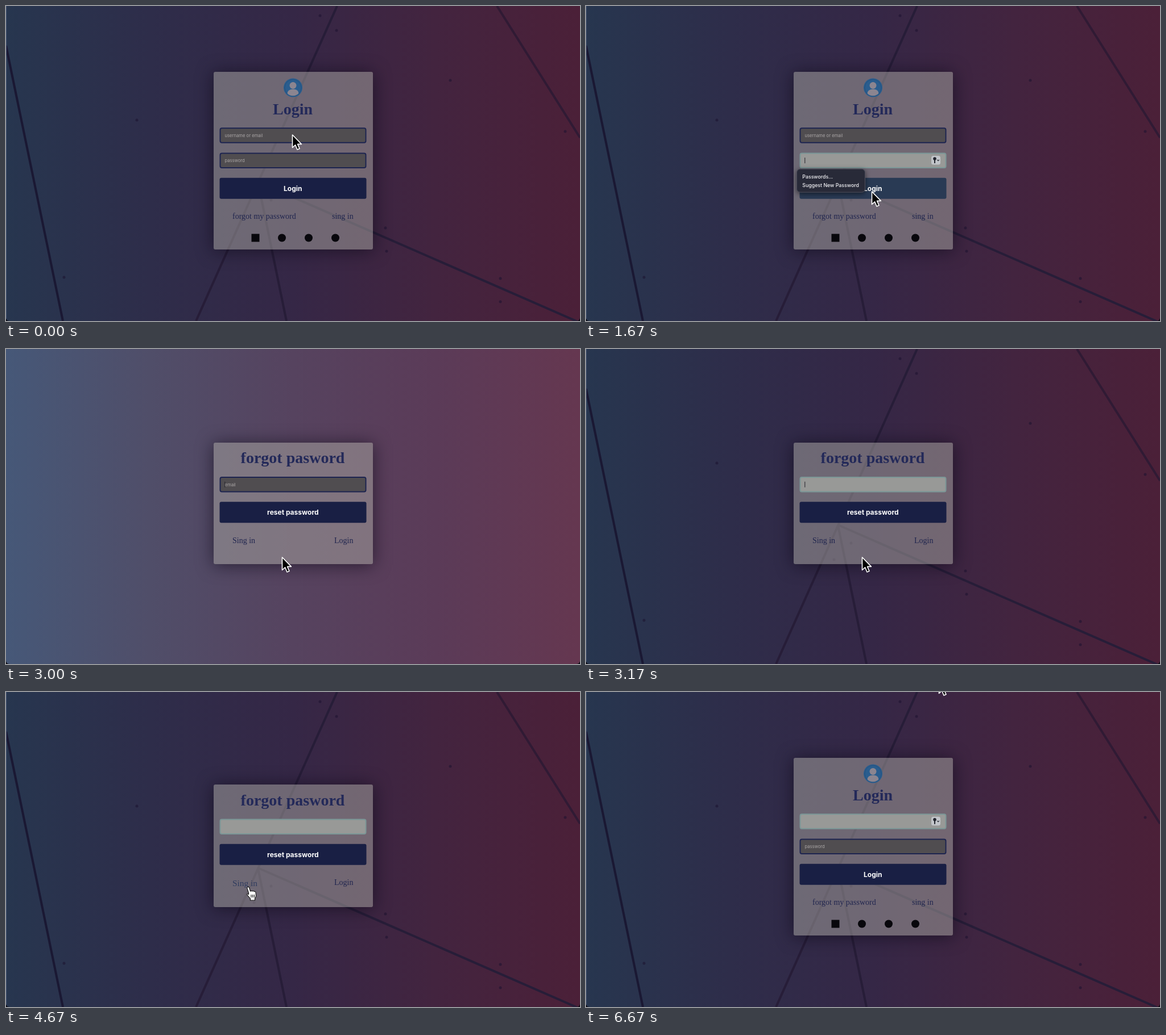
These frames come from a looping animation (1009x555 px, 6840 ms). An HTML page:

```html
<!DOCTYPE html>
<html lang="en">
<head>
<meta charset="utf-8">
<title>Login form</title>
<style>
html, body { margin: 0; width: 100%; height: 100%; overflow: hidden; background: #0b0a12; }
#stage { position: relative; width: 1009px; height: 555px; overflow: hidden; border-radius: 0 0 6px 6px;
  background: linear-gradient(90deg, #27364f, #2e2d4a 25%, #352746 50%, #43243f 75%, #4b2038); }
#stage.fresh { background: linear-gradient(90deg, #465878, #504e69 25%, #56435f 50%, #5b3b58 75%, #653750); }
#stage.fresh #lines { display: none; }
svg { position: absolute; left: 0; top: 0; }
#card { position: absolute; left: 364.5px; width: 280px; border-radius: 3px;
  background: rgba(170, 168, 162, .5); box-shadow: 0 2px 30px rgba(10, 6, 20, .6); }
text { white-space: pre; }
.title { font: bold 28px "Liberation Serif", serif; fill: #232959; text-anchor: middle; }
.link { font: 14px "Liberation Serif", serif; fill: #21264f; }
.ui { font: 7.65px Inter, sans-serif; fill: #aaa6a6; }
.button { font: bold 12px Inter, sans-serif; fill: #fff; text-anchor: middle; }
.menu { font: 500 8.8px Inter, sans-serif; fill: #f2f2f5; }
</style>
</head>
<body>
<div id="stage">
  <svg id="lines" width="1009" height="555" fill="none" stroke-width="4">
    <path stroke="#1a1833" d="M0 70L100 555"/>
    <path stroke="#271d38" d="M582 0L443 311L334 555M443 311L493 555M443 310L1009 558"/>
    <path stroke="#301a34" d="M863 0L1009 232"/>
    <g id="dots" fill="#1c1230" opacity=".55"></g>
    <path stroke="#4c5a78" stroke-width="1" d="M.5 0V555"/>
  </svg>
  <div id="card"></div>
  <svg id="form" width="1009" height="555"></svg>
</div>
<script>
const $ = id => document.getElementById(id);
const STEP = 1000 / 6, LAST = 40, LOOP = 6840;

// Pointer stops: step, x, y
const path = [[0, 503, 227], [4, 503, 227], [6, 502, 272], [8, 502, 272], [9, 502, 320], [10, 502, 327],
  [13, 502, 327], [16, 485, 367], [20, 485, 367], [22, 468, 290], [24, 468, 290], [26, 418, 337],
  [30, 418, 337], [32, 490, 370], [33, 493, 399], [36, 493, 399], [40, 620, -20]];
const clicks = [3, 8, 12, 17, 29, 35];

// Focus changes: step, field index
const focuses = [[0, -1], [3, 0], [8, 1], [13, 0], [18, 0], [30, 0], [36, 0]];

const pages = {
  login: { top: 115.5, bottom: 428.5, title: 'Login', base: 190.5, first: 214.3, button: 'Login',
    fields: ['username or email', 'password'],
    links: [['forgot my password', 398, 375, 112], ['sing in', 573, 375, 38]] },
  forgot: { top: 164.5, bottom: 378.5, title: 'forgot pasword', base: 201, first: 225, button: 'reset password',
    fields: ['email'],
    links: [['Sing in', 398, 341.5, 40], ['Login', 577, 341.5, 34]] },
  register: { top: 114, bottom: 430, title: 'Register', base: 151, first: 174.8, button: 'Register',
    fields: ['username', 'e-mail', 'password', 'password repeat'],
    links: [['Login', 487.5, 408, 34]] }
};

$('dots').innerHTML = [[581, 43], [552, 17], [781, 131], [983, 221], [667, 391], [669, 432], [869, 480],
  [869, 521], [230, 201], [102, 478], [466, 342], [436, 371]]
  .map(([x, y]) => `<circle cx="${x}" cy="${y}" r="2.5"/>`).join('');

const text = (kind, x, y, s, style = '') => `<text class="${kind}" x="${x}" y="${y}" style="${style}">${s}</text>`;
const box = (x, y, w, h, r, fill, more = '') =>
  `<rect x="${x}" y="${y}" width="${w}" height="${h}" rx="${r}" fill="${fill}" ${more}/>`;
const disc = (x, y, r, fill, more = '') => `<circle cx="${x}" cy="${y}" r="${r}" fill="${fill}" ${more}/>`;

function pointer(n) {
  const i = Math.max(1, path.findIndex(p => p[0] >= n));
  const [t0, x0, y0] = path[i - 1], [t1, x1, y1] = path[i];
  const u = Math.max(0, (n - t0) / (t1 - t0)), e = u * u * (3 - 2 * u);
  return [x0 + (x1 - x0) * e, y0 + (y1 - y0) * e];
}

const pageAt = n => pages[n < 18 || n > 35 ? 'login' : n < 30 ? 'forgot' : 'register'];
const within = ([px, py], x, y, w, h) => px >= x && px <= x + w && py >= y && py <= y + h;
const onLink = (p, [, x, y, w]) => within(p, x, y - 13, w, 18);

function avatar(y) {
  return disc(504.5, y, 16.5, '#2a5d8e') + disc(504.5, y, 14.6, 'none', 'stroke="#24517f"') +
    disc(504.5, y - 4, 6, '#8b8590') +
    `<path fill="#8b8590" d="M494.5 ${y + 10}q1-7.5 10-7.5t10 7.5q-4 4.3-10 4.3t-10-4.3z"/>`;
}

function keyIcon(y) {
  return box(607, y + 5.5, 16, 15.5, 3.5, '#c1c4c9') + disc(613, y + 10.5, 2.8, '#22252e') +
    `<path fill="none" stroke="#22252e" stroke-width="2" d="M613 ${y + 12}v6.5"/>` +
    `<path fill="none" stroke="#22252e" stroke-width="1.1" d="M617.3 ${y + 12.5}l1.8 1.8 1.8-1.8"/>`;
}

function field(label, y, focused, dim, caret, key) {
  const lit = focused && !dim;
  return box(376.5, y + 1, 256, 25.5, 3, lit ? '#989997' : '#504d50',
    `stroke="${lit ? '#7b9797' : '#1d2450'}" stroke-width="2"`) +
    (lit ? '' : text('ui', 384.5, y + 16.8, label)) +
    (caret ? box(384.3, y + 8.7, 1, 10, 0, '#22222a') : '') +
    (lit && key ? keyIcon(y) : '');
}

function menu(y) {
  return box(370.5, y, 120, 41, 6, '#282a38', 'stroke="#50505e" style="filter:drop-shadow(0 2px 4px #0008)"') +
    text('menu', 380.3, y + 16.4, 'Passwords...') + text('menu', 380.3, y + 31.8, 'Suggest New Password');
}

function cursor([x, y], hand) {
  return hand
    ? `<g transform="translate(${x + 5} ${y + 6})" stroke="#111" stroke-width="1.1">
       <path fill="#fff" d="M3.5 11L1 3Q.5 .3 2.8.4 4.5.5 5 3L6.5 8Q8 6.5 9.5 8 11.5 6.8 13 8.5 15.5 7.8 16 10.5L16.5 16Q16 19 14.5 20.5V24H6.5V21L1 14.5Q0 11.5 3.5 13.5Z"/>
       <path d="M8 14v5M10.7 14v5M13.4 14v5"/></g>`
    : `<path transform="translate(${x} ${y})" fill="#000" stroke="#fff" stroke-width="1.6" stroke-linejoin="round"
       d="M.5 0V22.5L5.6 17.8 9 26 13 24.3 9.6 16.4H16.4Z"/>`;
}

function ring([x, y]) {
  const at = r => [x - 2, y - 1, r, 'none'];
  return disc(...at(42.5), 'stroke="#fff" stroke-width="3.6"') + disc(...at(42.2), 'stroke="#111" stroke-width="1.8"');
}

function draw(n) {
  const page = pageAt(n), isLogin = page === pages.login, fresh = n === 18;
  const now = pointer(n), before = pointer(Math.max(0, n - 1));
  const [since, focus] = focuses.filter(f => f[0] <= n).pop();
  const settled = pageAt(Math.max(0, n - 1)) === page;
  const hot = page.links.findIndex(l => settled && onLink(before, l));
  const lift = hot < 0 ? 0 : 1.5;
  const rowY = i => page.first + i * 44.15 - lift;
  const buttonY = rowY(page.fields.length) + .2;
  const overButton = settled && within(before, 376, buttonY, 258, 37);

  $('stage').className = fresh ? 'fresh' : '';
  $('card').style.top = page.top - lift + 'px';
  $('card').style.height = page.bottom - page.top + lift * 1.5 + 'px';

  let out = isLogin ? avatar(144 - lift) : '';
  out += text('title', 504, page.base - lift, page.title);
  page.fields.forEach((label, i) => {
    const on = i === focus;
    out += field(label, rowY(i), on, fresh, on && (n - since) % 6 < 4, isLogin);
  });
  out += box(375.5, buttonY, 258, 37, 3, overButton ? '#293a54' : '#191f44') +
    text('button', 504.3, buttonY + 23, page.button);
  page.links.forEach(([s, x, y], i) => {
    out += text('link', x, y - (i === hot ? 0 : lift), s, i === hot ? 'font-size:15.4px;fill:#303c5f' : '');
  });
  if (isLogin) {
    const y = 408.5 + lift / 2;
    out += box(431.5, y - 7, 14, 14, 0, '#08070c');
    for (const x of [485, 532, 579]) out += disc(x, y, 7, '#08070c');
  }
  if (n >= 3 && n < 13) out += menu(rowY(focus) + 28.7);
  if (clicks.includes(n)) out += ring(now);
  $('form').innerHTML = out + cursor(now, page.links.some(l => onLink(now, l)));
}

let shown = -1;
const start = performance.now();
function tick() {
  const t = (performance.now() - start) % LOOP;
  const n = Math.min(LAST, Math.floor((t + 4) / STEP));
  if (n !== shown) draw(shown = n);
  requestAnimationFrame(tick);
}
tick();
</script>
</body>
</html>
```
